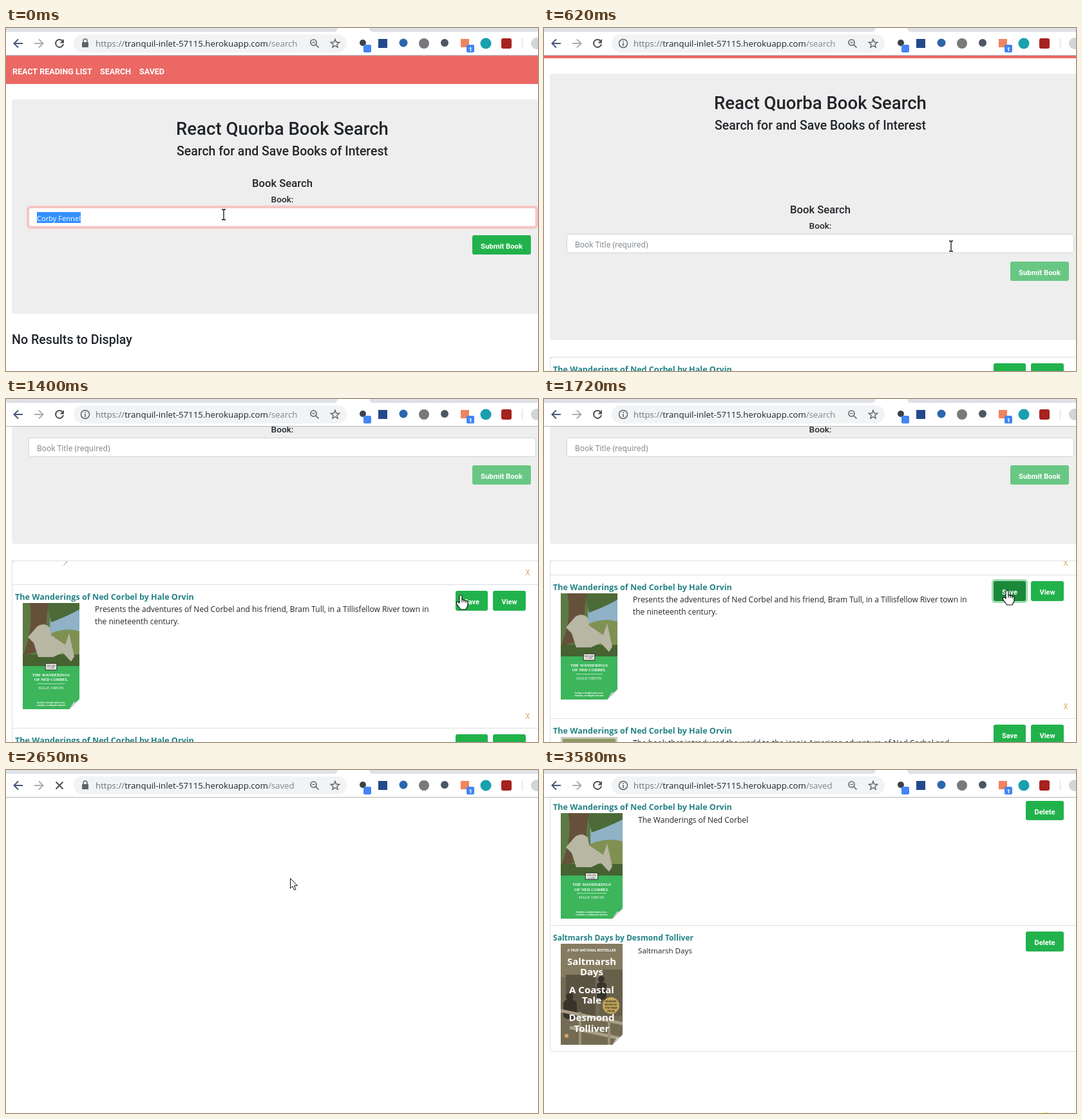
Recreate the animation shown at these times as an HTML page with a canvas. Size 826 by 533 pixels, loop 3660 ms.

```html
<!DOCTYPE html>
<html lang="en">
<head>
<meta charset="utf-8">
<title>Reading list</title>
<style>
  html, body { margin: 0; width: 100%; height: 100%; overflow: hidden; background: #fff; }
  canvas { display: block; width: 826px; height: 533px; }
</style>
</head>
<body>
<canvas id="stage" width="826" height="533"></canvas>
<script>
const W = 826, H = 533, TOP = 43, LOOP = 3660;
const ctx = document.getElementById('stage').getContext('2d');
const BODY = '"Open Sans", "Noto Sans", sans-serif';
const HEAD = 'Roboto, "Liberation Sans", sans-serif';
const SERIF = '"Liberation Serif", serif';
const GREEN = '#22b24c', LINE = '#dfdfdf', INK = '#212529';
const BOOK = 'The Wanderings of Ned Corbel', AUTHOR = 'Hale Orvin';
const MEMOIR = 'Saltmarsh Days', MEMOIRIST = 'Desmond Tolliver';

// Each step overrides part of the state and holds until the next one.
const steps = [
  [0, { view: 'search', path: '/search', scroll: 0, list: 0, typed: 'Corby Fennel', selected: true,
        suggest: false, results: false, secure: true, loading: false, save: '', spot: false,
        cursor: ['beam', 338, 290] }],
  [150, { typed: 'n', selected: false, suggest: true }],
  [320, { typed: '', suggest: false }],
  [470, { results: true, secure: false, cursor: ['arrow', 470, 320] }],
  [620, { scroll: 40, cursor: ['beam', 632, 339] }],
  [770, { scroll: 170, cursor: ['arrow', 655, 335] }],
  [930, { scroll: 300, cursor: ['hand', 670, 321] }],
  [1100, { list: 30 }],
  [1250, { list: 60, cursor: ['hand', 688, 313] }],
  [1400, { list: 85, cursor: ['hand', 706, 304] }],
  [1570, { list: 100, save: 'hover', cursor: ['hand', 719, 297] }],
  [1720, { save: 'pressed' }],
  [1890, { list: 75, save: 'focus', cursor: ['hand', 712, 299] }],
  [2040, { list: 38, cursor: ['arrow', 692, 301] }],
  [2200, { list: 0, cursor: ['arrow', 673, 303] }],
  [2350, { scroll: 269 }],
  [2500, { scroll: 0, path: '/saved', secure: true, loading: true, cursor: ['hand', 226, 67] }],
  [2650, { view: 'blank', cursor: ['arrow', 441, 168] }],
  [2820, { view: 'saved', results: false, loading: false, cursor: ['arrow', 520, 240] }],
  [2970, { results: true, secure: false, cursor: ['arrow', 640, 350] }],
  [3130, { scroll: 39, cursor: ['arrow', 730, 460] }],
  [3280, { scroll: 337, cursor: null }],
  [3430, { scroll: 339 }],
  [3580, { spot: true }],
];

function stateAt(t) {
  return Object.assign({}, ...steps.filter(([start]) => start <= t).map(([, change]) => change));
}

function box(x, y, w, h, fill, radius = 0, stroke) {
  ctx.beginPath();
  ctx.roundRect(x, y, w, h, radius);
  if (fill) { ctx.fillStyle = fill; ctx.fill(); }
  if (stroke) { ctx.strokeStyle = stroke; ctx.lineWidth = 1; ctx.stroke(); }
}

function disc(x, y, r, fill) {
  ctx.beginPath();
  ctx.arc(x, y, r, 0, Math.PI * 2);
  ctx.fillStyle = fill;
  ctx.fill();
}

function line(path, color, width = 1) {
  ctx.strokeStyle = color;
  ctx.lineWidth = width;
  ctx.stroke(new Path2D(path));
}

function shape(path, color) {
  ctx.fillStyle = color;
  ctx.fill(new Path2D(path));
}

// Draws text and returns its width; the size drops evenly when it exceeds max.
function text(s, x, y, { size = 12, max = 999, weight = 400, family = BODY, color = INK, align = 'left', stretch = 'normal' } = {}) {
  const setFont = px => {
    ctx.font = `${weight} ${px}px ${family}`;
    ctx.fontStretch = stretch;
  };
  setFont(size);
  let width = ctx.measureText(s).width;
  if (width > max) {
    setFont(size * max / width);
    width = max;
  }
  ctx.fillStyle = color;
  ctx.textAlign = align;
  ctx.fillText(s, x, y);
  return width;
}

function heading(s, x, y, size, max, options = {}) {
  text(s, x, y, { size, max, weight: 500, family: HEAD, stretch: 'condensed', ...options });
}

function clipped(x, y, w, h, draw) {
  ctx.save();
  ctx.beginPath();
  ctx.rect(x, y, w, h);
  ctx.clip();
  draw();
  ctx.restore();
}

function button(label, x, y, w, h, labelWidth, fill = GREEN, ring = false) {
  if (ring) box(x - 3, y - 3, w + 6, h + 6, '#a4dcb4', 5);
  box(x, y, w, h, fill, 3);
  heading(label, x + w / 2, y + 21, 14.5, labelWidth, { weight: 700, color: '#fff', align: 'center' });
}

function toolbar(s) {
  box(0, 0, W, TOP, '#fff');
  box(-9, -9, 524, 15, '#dee1e6', [0, 0, 6, 0]);
  box(564, -9, 300, 15, '#dee1e6', [0, 0, 0, 6]);
  box(0, 42, W, 1, '#b4b6b9');
  line('M26 24H13M19 17.5L12.5 24L19 30.5', '#46587a', 2);
  line('M44 24H57M51 17.5L57.5 24L51 30.5', '#abaeb3', 2);
  if (s.loading) {
    line('M77.5 18.5L88.5 29.5M88.5 18.5L77.5 29.5', '#4d5156', 2);
  } else {
    line('M87.5 19.8A6 6 0 1 0 89 25', '#4d5156', 2);
    shape('M90 17V23.5H83.5Z', '#4d5156');
  }

  box(105, 10, 424, 28, '#f1f3f4', 14);
  if (s.secure) {
    box(118, 22, 10, 8, '#5f6368', 1);
    line('M120 22V20A3 3 0 0 1 126 20V22', '#5f6368', 1.5);
  } else {
    line('M129.5 24A6.5 6.5 0 1 1 116.5 24A6.5 6.5 0 1 1 129.5 24', '#5f6368', 1.5);
    line('M123 20V21.7M123 23V28', '#5f6368', 1.6);
  }
  let x = 139;
  for (const [part, color] of [['https://', '#6f7377'], ['tranquil-inlet-57115.herokuapp.com', INK], [s.path, '#80868b']])
    x += text(part, x, 29, { size: 13.25, color });

  line('M482 22.5A4.5 4.5 0 1 1 473 22.5A4.5 4.5 0 1 1 482 22.5M481 26L485.5 30.5M475.5 22.5H479.5', '#5f6368', 1.6);
  let star = '';
  for (let i = 0; i < 10; i++) {
    const r = i % 2 ? 3 : 7, a = (i / 5 - 0.5) * Math.PI;
    star += `${i ? 'L' : 'M'}${511 + r * Math.cos(a)} ${24.5 + r * Math.sin(a)}`;
  }
  line(star + 'Z', '#5f6368', 1.4);

  disc(554, 23, 5, '#3c4147');
  box(555, 26, 12, 12, '#4285f4', 2);
  box(578, 17, 14, 14, '#234a8c');
  disc(617, 23, 6.5, '#2c66ad');
  disc(649, 24, 8, '#77797c');
  disc(681, 23, 6, '#4b5763');
  box(706, 17, 13, 13, '#f0845f');
  box(715, 26, 12, 12, '#4285f4', 2);
  text('1', 721, 35.5, { size: 9, weight: 700, color: '#fff', align: 'center' });
  disc(745, 24, 8.5, '#1a9fae');
  box(769, 16, 16, 16, '#a6221f', 3);
  box(801, 16, 1, 16, '#d5d7da');
  disc(824, 24, 9, '#d3d5d8');
}

function masthead(dy, bottom) {
  box(0, 43 + dy, W, 44, '#eb6864');
  const nav = { weight: 700, color: '#fff' };
  heading('REACT READING LIST', 10, 72 + dy, 16, 124, nav);
  heading('SEARCH', 146, 72 + dy, 16, 48, nav);
  heading('SAVED', 207, 72 + dy, 16, 39, nav);
  box(9, 111 + dy, W, bottom - 111, '#eee', 4);
  heading('React Quorba Book Search', 429, 166 + dy, 35, 330, { align: 'center' });
  heading('Search for and Save Books of Interest', 429, 198 + dy, 24, 328, { align: 'center' });
}

function searchForm(s, dy) {
  heading('Book Search', 429, 247 + dy, 21, 94, { align: 'center' });
  heading('Book:', 429, 271 + dy, 17, 35, { align: 'center' });
  if (s.typed) box(32, 276 + dy, 794, 36, '#f7c8c6', 6);
  box(35.5, 279.5 + dy, 787, 29, '#fff', 3, s.typed ? '#f3b9b6' : '#ced4da');
  if (s.selected) {
    box(48, 286 + dy, 68, 17, '#3390ff');
    text(s.typed, 48, 300 + dy, { max: 68, color: '#fff' });
  } else if (s.typed) {
    text(s.typed, 48, 300 + dy, { color: '#495057' });
  } else {
    text('Book Title (required)', 48, 300 + dy, { max: 115, color: '#7b8288' });
  }
  button('Submit Book', 724, 322 + dy, 91, 30, 65, s.typed ? GREEN : '#69c784');
  if (s.suggest) {
    box(33.5, 311.5 + dy, 169, 165, '#fff', 0, '#b5b5b5');
    ['ned corbel', 'new poems', 'night garden', 'northern lights', 'nine stones', 'narrow water', 'nature walks', 'needlework']
      .forEach((word, i) => text(word, 48, 326 + i * 20 + dy));
  }
}

function pageCurl(x, y, size) {
  shape(`M${x} ${y}V${y - size}L${x - size} ${y}Z`, '#fff');
  shape(`M${x} ${y - size}Q${x - size * .3} ${y - size * .6} ${x - size * .55} ${y - size * .7}L${x - size} ${y}Z`, '#c9d0d4');
  line(`M${x} ${y - size}L${x - size} ${y}`, '#8f989d', .7);
}

function novelCover(x, y, w, h) {
  const split = Math.round(h * .594), mid = x + w / 2;
  const print = (s, f, size, max, options) =>
    text(s, mid, y + h * f, { size, max, family: SERIF, color: '#fff', align: 'center', ...options });
  clipped(x, y, w, split, () => {
    box(x, y, w, split, '#5d7a45');
    box(x + w * .48, y, w * .52, split * .5, '#8fb2c6');
    shape(`M${x + w * .42} ${y}H${x + w}V${y + 10}Q${x + w * .75} ${y + 22} ${x + w * .5} ${y + 30}Z`, '#4d6b38');
    shape(`M${x + w} ${y + 44}Q${x + w * .7} ${y + 36} ${x + w * .4} ${y + 52}V${y + split}H${x + w}Z`, '#7f9152');
    shape(`M${x + w * .12} ${y}H${x + w * .46}Q${x + w * .36} ${y + 45} ${x + w * .5} ${y + 70}L${x} ${y + 82}Q${x + w * .2} ${y + 40} ${x + w * .12} ${y}Z`, '#65513a');
    box(x, y + split - 18, w, 18, '#466331');
    // reclining figure
    shape(`M${x + 22} ${y + 37}Q${x + 33} ${y + 29} ${x + 42} ${y + 38}L${x + 44} ${y + 50}L${x + 66} ${y + 65}L${x + 72} ${y + 47}L${x + 80} ${y + 83}L${x + 75} ${y + 91}L${x + 62} ${y + 77}L${x + 47} ${y + 84}L${x + 24} ${y + 84}L${x + 17} ${y + 62}L${x + 8} ${y + 53}Z`, '#b8b7a4');
  });
  box(x, y + split, w, h - split, '#3cb55b');
  box(mid - w * .1, y + split - 4, w * .2, 10, '#f7f7f2', 0, '#222');
  print('FIRESIDE', .6, 3.4, 15, { color: '#222' });
  print('CLASSIC', .62, 3.2, 13, { color: '#222' });
  print('THE WANDERINGS', .69, 6.5, w * .66, { weight: 700 });
  print('OF NED CORBEL', .735, 6.5, w * .6, { weight: 700 });
  box(mid - w * .24, y + h * .758, w * .48, .7, '#d5f0dc');
  print('HALE ORVIN', .81, 6.5, w * .47);
  print('Includes a detailed author note,', .945, 3.6, w * .5, { weight: 700 });
  print('a timeline, a reading list and more', .967, 3.6, w * .52, { weight: 700 });
  pageCurl(x + w, y + h, 16);
}

function titlePageCover(x, y) {
  const print = (s, dy, size, max, color = '#777') =>
    text(s, x + 40, y + dy, { size, max, family: SERIF, color, align: 'center' });
  box(x, y, 88, 64, '#fff');
  print('THE  WANDERINGS', 7, 3.6, 34);
  print('OF', 12, 3, 8);
  ctx.letterSpacing = '1px';
  print('NED  CORBEL', 18, 8, 70, '#4f6a6a');
  ctx.letterSpacing = '0px';
  print('BY', 23, 2.8, 6);
  print('HALE  ORVIN', 29, 5, 32);
  box(x + 26, y + 38, 28, .6, '#ccc');
  print('WITH NUMEROUS DRAWINGS AND NOTES ON THE TEXT', 51, 3.3, 64);
  print('FIRST EDITION', 56, 3, 20);
  pageCurl(x + 88, y + 64, 25);
}

function memoirCover(x, y) {
  const w = 96, h = 157, mid = x + 48;
  clipped(x, y, w, h, () => {
    box(x, y, w, h, '#746b54');
    box(x, y, w, 52, '#857b61');
    box(x + 8, y + 48, 46, 64, '#5b5341');
    box(x + 60, y + 40, 36, 72, '#685f4a');
    disc(x + 14, y + 82, 6, '#38332a');
    box(x + 4, y + 87, 21, 30, '#38332a', 7);
    disc(x + 63, y + 55, 5, '#38332a');
    box(x + 56, y + 60, 15, 27, '#38332a', 5);
    line(`M${x} ${y + 104}L${x + w} ${y + 124}M${x + 14} ${y + 130}L${x + w} ${y + 148}`, '#a99f86', 5);
    line(`M${x + 30} ${y + 106}V${y + h}M${x + 75} ${y + 116}V${y + h}`, '#9b9178', 4);
  });
  text('A TRUE NATIONAL BESTSELLER', mid, y + 12, { size: 5, max: 76, weight: 700, color: '#fff', align: 'center' });
  [['Saltmarsh', 33], ['Days', 49], ['A Coastal', 77], ['Tale', 93], ['Desmond', 120], ['Tolliver', 137]].forEach(([word, dy]) =>
    text(word, mid, y + dy, { size: 15, max: 76, weight: 700, color: '#fff', align: 'center' }));
  disc(x + 78, y + 96, 13, '#c2a55b');
  ['WINNER', 'BOOK OF', 'THE YEAR', 'PRIZE'].forEach((word, i) =>
    text(word, x + 78, y + 91 + i * 5, { size: 4.2, max: 19, weight: 700, color: '#3a3222', align: 'center' }));
  disc(x + 9, y + 143, 3, '#d9a36a');
  pageCurl(x + w, y + h, 16);
}

function itemTitle(name, y, max) {
  text(name, 14, y + 24, { size: 12.6, max, weight: 700, color: '#258286' });
}

function result(y, h, focus) {
  box(9, y, W, 1, LINE);
  itemTitle(`${BOOK} by ${AUTHOR}`, y, 279);
  const fill = { hover: '#1c9640', pressed: '#1a8839' }[focus] || GREEN;
  button('Save', 698, y + 10, 50, 31, 24, fill, focus === 'pressed' || focus === 'focus');
  button('View', 756, y + 10, 51, 31, 24);
  text('X', 810, y + h - 14, { color: '#d9a04a', align: 'center' });
}

function resultList(s, top) {
  box(9.5, top + .5, W, H, '#fff', 4, LINE);
  clipped(9, top, W, H, () => {
    const first = top - s.list, second = first + 122, third = second + 223;
    result(first, 122);
    titlePageCover(26, first + 29);
    result(second, 223, s.save);
    novelCover(26, second + 29, 88, 165);
    text('Presents the adventures of Ned Corbel and his friend, Bram Tull, in a Tillisfellow River town in', 138, second + 43, { max: 532 });
    text('the nineteenth century.', 138, second + 62);
    result(third, 223);
    box(26, third + 29, 88, 165, '#c9ccc0');
    box(29, third + 32, 82, 159, '#8c9a62');
    text('The book that introduced the world to the iconic American adventure of Ned Corbel and', 138, third + 43, { max: 508 });
    box(9, top, W, 1, LINE);
    box(9, top, 1, H, LINE);
  });
}

function savedList(top) {
  box(9.5, top + .5, W, 399, '#fff', 4, LINE);
  const second = top + 203;
  box(9, second, W, 1, LINE);
  itemTitle(`${BOOK} by ${AUTHOR}`, top, 279);
  novelCover(26, top + 29, 96, 164);
  text(BOOK, 146, top + 44, { max: 175 });
  button('Delete', 748, top + 10, 59, 30, 32);
  itemTitle(`${MEMOIR} by ${MEMOIRIST}`, second, 218);
  memoirCover(26, second + 29);
  text(MEMOIR, 146, second + 44, { max: 84 });
  button('Delete', 748, second + 10, 59, 31, 32);
}

function page(s) {
  const dy = -s.scroll;
  if (s.view === 'search') {
    const grow = s.results ? 81 : 0;
    masthead(dy, 444 + grow);
    searchForm(s, dy + grow);
    if (s.results) resultList(s, 551 + dy);
    else heading('No Results to Display', 9, 491, 24, 187);
  } else if (s.view === 'saved') {
    masthead(dy, 351);
    if (s.results) savedList(377 + dy);
  }
}

const cursors = {
  beam() {
    line('M-3 -8H-1L0 -7L1 -8H3M0 -7V7M-3 8H-1L0 7L1 8H3', '#111', 1.3);
  },
  arrow() {
    const path = 'M.5 .5V16L4 12.7L6.5 18.5L9 17.4L6.5 11.7H11.5Z';
    shape(path, '#fff');
    line(path, '#111');
  },
  hand() {
    const path = 'M-2 13V2Q0 -1 2 2V8Q4 7 5 9Q7 8 8 10Q11 9 11 12V17L8 23H0L-6 15Q-8 11 -5 11Z';
    shape(path, '#fff');
    line(path, '#111', 1.2);
    line('M2 8V12M5 9V12M8 10V13', '#111');
  },
};

function render(t) {
  const s = stateAt(t);
  box(0, 0, W, H, '#fff');
  clipped(0, TOP, W, H - TOP, () => page(s));
  toolbar(s);
  if (s.spot) box(774, 532, 9, 1, '#f6ee78');
  if (s.cursor) {
    const [kind, x, y] = s.cursor;
    ctx.save();
    ctx.translate(x, y);
    cursors[kind]();
    ctx.restore();
  }
}

const start = performance.now();
function tick() {
  render((performance.now() - start) % LOOP);
  requestAnimationFrame(tick);
}
tick();
</script>
</body>
</html>
```
